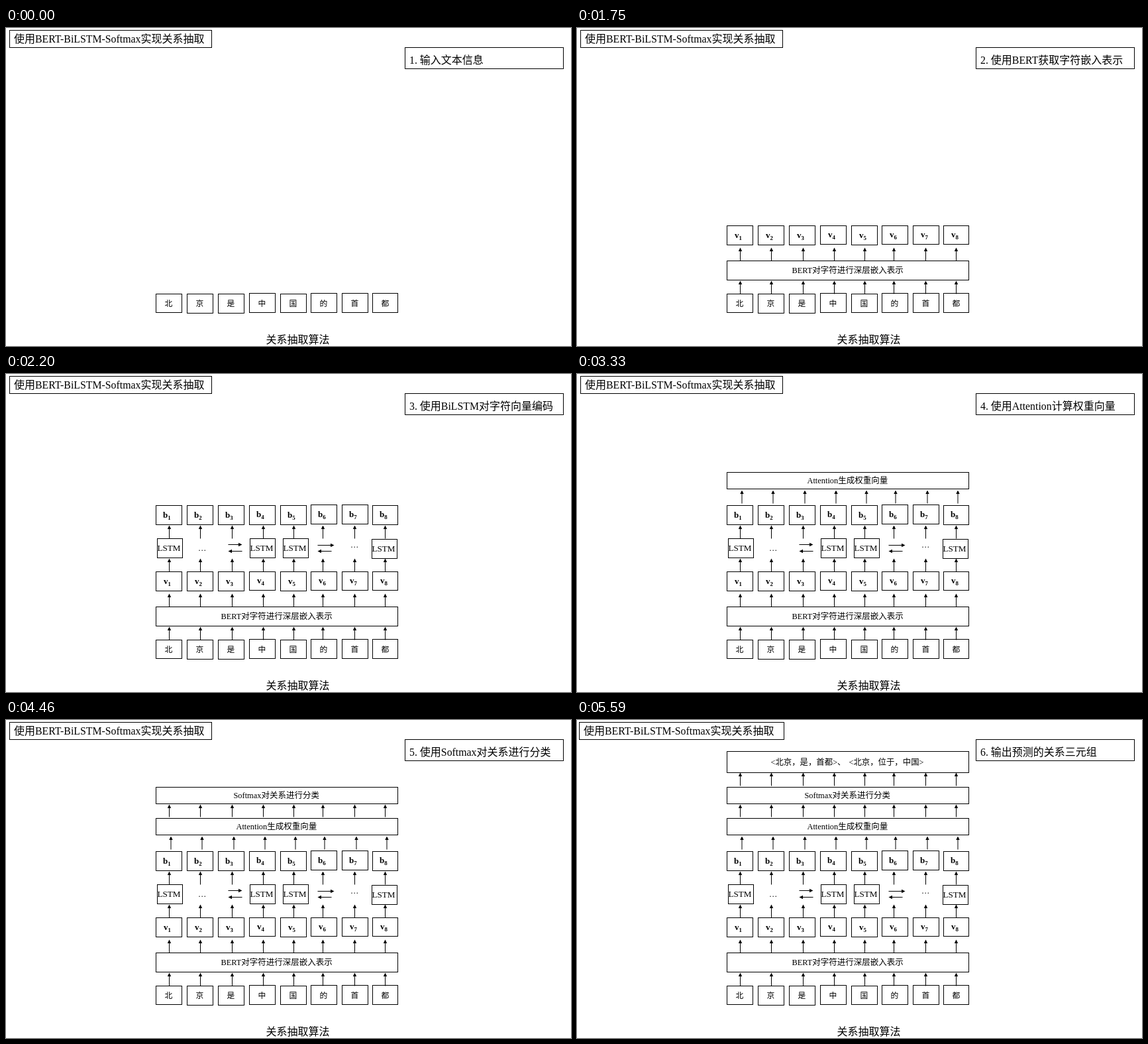
Animation of 853 by 480 pixels, one loop 6.72 s. Source, as an HTML page:

```html
<!DOCTYPE html>
<html lang="zh-CN">
<head>
<meta charset="utf-8">
<title>关系抽取算法</title>
<style>
html, body { margin: 0; width: 100%; height: 100%; overflow: hidden; background: #fff; }
svg { display: block; width: 100%; height: 100%; }
text { font-family: "Liberation Serif", "Noto Sans CJK SC", "Noto Sans CJK", serif; white-space: pre; }
rect { fill: #fff; stroke: #000; shape-rendering: crispEdges; }
</style>
</head>
<body>
<svg id="stage" viewBox="0 0 853 480"></svg>
<script>
const NS = 'http://www.w3.org/2000/svg';
const stage = document.getElementById('stage');
const LOOP = 6720, FIRST = 1070, HOLD = 1130;

const steps = ['1. 输入文本信息', '2. 使用BERT获取字符嵌入表示', '3. 使用BiLSTM对字符向量编码',
  '4. 使用Attention计算权重向量', '5. 使用Softmax对关系进行分类', '6. 输出预测的关系三元组'];
const cellX = [226, 273, 320, 367, 414, 460, 507, 553];
const stemX = [246, 293, 341, 388, 434, 478, 526, 572];
const lift = [0, 0, 0, 1, 0, 1, 1, 1];

function add(parent, tag, attrs) {
  const el = document.createElementNS(NS, tag);
  for (const k in attrs) el.setAttribute(k, attrs[k]);
  parent.appendChild(el);
  return el;
}

function box(g, x1, y1, x2, y2) {
  return add(g, 'rect', { x: x1 + .5, y: y1 + .5, width: x2 - x1, height: y2 - y1 });
}

function cell(g, i, top, bottom) {
  box(g, cellX[i], top, cellX[i] + (i < 7 ? 39 : 38), bottom);
}

// Latin runs are set slightly smaller than the Chinese ones.
function fill(el, str, size) {
  el.textContent = '';
  for (const run of str.match(/[\x00-\x7f]+|[^\x00-\x7f]+/g)) {
    const latin = run.charCodeAt(0) < 128;
    add(el, 'tspan', { 'font-size': latin ? size * .99 : size }).textContent = run;
  }
}

function label(g, str, x, y, size, anchor = 'start') {
  const el = add(g, 'text', { x, y, 'text-anchor': anchor });
  fill(el, str, size);
  return el;
}

function arrow(g, x1, y1, x2, y2) {
  const len = Math.hypot(x2 - x1, y2 - y1);
  const turn = Math.atan2(y2 - y1, x2 - x1) * 180 / Math.PI;
  const at = { transform: `translate(${x2 + .5} ${y2 + .5}) rotate(${turn})` };
  add(g, 'path', { d: `M${-len} 0H-3`, stroke: '#000', ...at });
  add(g, 'path', { d: 'M0 0L-5.5 -2.7V2.7Z', ...at });
}

function stems(g, from, to, xs = stemX) {
  for (const x of xs) arrow(g, x, from, x, to);
}

function bar(g, y1, y2, str, x, base) {
  box(g, 226, y1, 591, y2);
  if (str) label(g, str, x, base, 12.5);
}

function vector(g, letter, i, x, base) {
  const el = add(g, 'text', { x: cellX[i] + x, y: base - lift[i], 'font-size': 13, 'font-weight': 'bold' });
  el.textContent = letter;
  add(el, 'tspan', { dy: 2.5, 'font-size': 8.8 }).textContent = i + 1;
}

const layers = steps.map(() => add(stage, 'g', {}));
const [input, embed, encode, attend, classify, output] = layers;

const titleBox = box(stage, 5, 3, 310, 29);
const title = label(stage, '使用BERT-BiLSTM-Softmax实现关系抽取', 12, 22, 16);
box(stage, 602, 29, 841, 61);
const note = label(stage, steps[0], 609, 54, 16);
label(stage, '关系抽取算法', 392.5, 475.5, 16);

[...'北京是中国的首都'].forEach((ch, i) => {
  cell(input, i, 401 - lift[i], i === 1 || i === 2 ? 430 : 429);
  label(input, ch, cellX[i] + 19.3, 419.5, 11.8, 'middle');
});

stems(embed, 401, 381);
bar(embed, 351, 380, 'BERT对字符进行深层嵌入表示', 324.5, 370);
stems(embed, 351, 331);
cellX.forEach((x, i) => {
  cell(embed, i, 298, 327 - lift[i]);
  vector(embed, 'v', i, 12, 317);
});

stems(encode, 298, 278);
for (const [x, y] of [[228, 248], [368, 248], [418, 248], [552, 249]]) {
  box(encode, x, y, x + 38, y + 29);
  label(encode, 'LSTM', x + .4, y + 19, 13.3);
}
label(encode, '…', 290, 267, 12.3);
label(encode, '…', 520, 262, 12.3);
arrow(encode, 335, 257, 356, 257);
arrow(encode, 356, 267, 335, 267);
arrow(encode, 470, 258, 495, 258);
arrow(encode, 491, 267, 470, 267);
stems(encode, 248, 228);
cellX.forEach((x, i) => {
  const up = i === 5 || i === 6 ? 1 : 0;
  cell(encode, i, 198 - up, 227 - up);
  vector(encode, 'b', i, 11, 217);
});

stems(attend, 195, 175, stemX.map(x => x + 2.5));
bar(attend, 148, 173, 'Attention生成权重向量', 347.5, 165);

stems(classify, 146, 127);
bar(classify, 101, 126, 'Softmax对关系进行分类', 343.5, 118);

stems(output, 99, 79);
bar(output, 47, 79);
label(output, '<北京，是，首都>、', 292.5, 67.5, 12.4);
label(output, '<北京，位于，中国>', 410.5, 67.5, 12.4);

let shown = -1;
function draw(ms) {
  const t = ms % LOOP;
  const step = t < FIRST ? 0 : Math.min(5, 1 + Math.floor((t - FIRST) / HOLD));
  if (step === shown) return;
  shown = step;
  layers.forEach((g, i) => g.setAttribute('visibility', i <= step ? 'visible' : 'hidden'));
  fill(note, steps[step], 16);
  const last = step === 5;
  titleBox.setAttribute('x', last ? 3.5 : 5.5);
  titleBox.setAttribute('width', last ? 309 : 305);
  title.setAttribute('x', last ? 10 : 12);
}

const start = performance.now();
function tick() {
  draw(performance.now() - start);
  requestAnimationFrame(tick);
}
tick();
</script>
</body>
</html>
```
